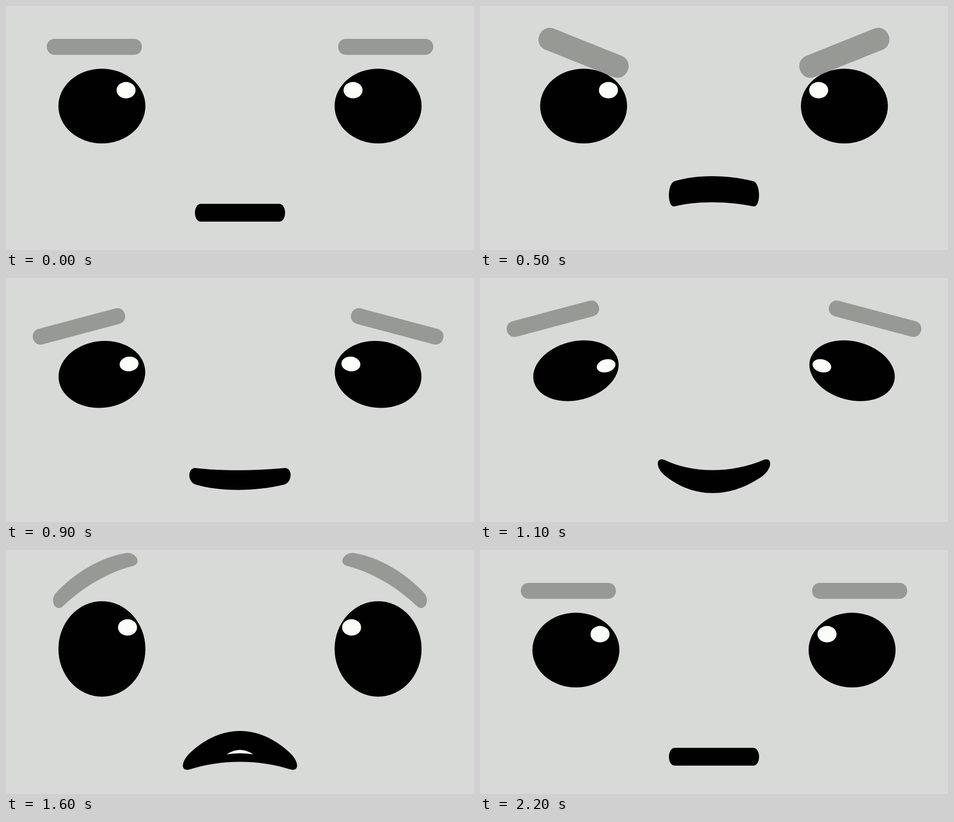
An HTML page with a canvas that plays this animation: 1033 by 542 pixels, repeating every 2300 ms.

```html
<!DOCTYPE html>
<html lang="en">
<head>
<meta charset="utf-8">
<title>Changing face</title>
<style>
  html, body { margin: 0; width: 100%; height: 100%; overflow: hidden; background: #d8dad7; }
  canvas { display: block; width: 1033px; height: 542px; }
</style>
</head>
<body>
<canvas id="stage" width="1033" height="542"></canvas>
<script>
const ctx = document.getElementById('stage').getContext('2d');
const W = 1033, H = 542, LOOP = 2300, STEP = 100;
const BROW_HALF = 105;
const BACK = '#d8dad7', BLACK = '#000100', GREY = '#979994', WHITE = '#fbfdf9';

// Lengths are pixels, tilts are degrees. Arch lifts the upper edge of a bar
// and hollow the lower one; lean moves the peak of both sideways.
// The left eye and brow are given; the right ones are mirrored and shifted.
const neutral = {
  eyeX: 211.7, eyeY: 222.3, eyeW: 96, eyeH: 83, eyeTilt: 0,
  glintX: 53.3, glintY: -35.3, glintShift: -2,
  browX: 195, browY: 90.7, browR: 17.7, browTilt: 0,
  browArch: 0, browHollow: 0, browLean: 0, browShift: 0,
  mouthY: 459.2, mouthHalf: 99.5, mouthR: 19.7,
  mouthArch: 0, mouthHollow: 0, mouthLean: 0, teeth: 0
};
const angry = {
  ...neutral, eyeX: 228.7, glintX: 54.8,
  browX: 228.7, browY: 115.4, browR: 25.3, browTilt: 15,
  mouthY: 417, mouthR: 28, mouthArch: 11, mouthHollow: 9, mouthLean: -6
};
const furious = { ...angry, browY: 104, browTilt: 22 };
const sad = {
  ...neutral, glintShift: 0,
  browX: 161, browY: 124.5, browTilt: -15, browShift: -17,
  mouthArch: 12.5, mouthHollow: 15, mouthLean: -9
};
const content = {
  ...sad, eyeY: 206, eyeH: 65, eyeTilt: -15, glintX: 66.7, glintY: -11,
  browY: 90.5, browShift: 0,
  mouthY: 422, mouthHalf: 124, mouthR: 17.2, mouthArch: -22, mouthHollow: -38.5, mouthLean: -4
};
const joyful = { ...content, browX: 144, browY: 79.5, mouthHollow: -96 };
const afraid = {
  ...neutral, eyeY: 219.8, eyeH: 106, glintX: 56.5, glintY: -47.8,
  browY: 65.5, browR: 16.5, browTilt: -30, browArch: 14, browHollow: 11, browLean: 4,
  mouthY: 468.5, mouthHalf: 126, mouthR: 18.5, mouthArch: 48, mouthHollow: 16.5, teeth: 1
};
const surprised = {
  ...neutral, eyeX: 206.2, eyeY: 184.7, eyeW: 84.5, eyeH: 103.5,
  glintX: 48.5, glintY: -38.4, glintShift: 0,
  browY: 41, browArch: 16.5, browHollow: 17.5, browLean: -6,
  mouthY: 472.9, mouthHalf: 81.5, mouthR: 40.2
};
const gasping = { ...surprised, mouthR: 63 };

const keys = [
  [0, neutral], [300, angry], [500, furious], [600, angry], [700, sad],
  [1100, content], [1200, joyful], [1600, afraid], [1800, gasping],
  [1900, surprised], [2200, neutral], [LOOP, neutral]
];

function poseAt(time) {
  const next = keys.findIndex(([start]) => start > time);
  const [t0, from] = keys[next - 1], [t1, to] = keys[next];
  const u = (time - t0) / (t1 - t0);
  const pose = {};
  for (const name in from) pose[name] = from[name] + (to[name] - from[name]) * u;
  return pose;
}

const radians = degrees => degrees * Math.PI / 180;

// A bar with round ends that carry on along the slope of its bent edges.
function bar(x, y, half, r, cap, tilt, arch, hollow, lean, color) {
  const end = half - cap, reach = end * 0.38;
  const out = end + cap * 4 / 3;
  const drop = bend => bend * 4 / 3 * (out - end) / (end - reach);
  const top = -r - arch * 4 / 3, bottom = r - hollow * 4 / 3;
  const upper = -r + drop(arch), lower = r + drop(hollow);
  ctx.save();
  ctx.translate(x, y);
  ctx.rotate(radians(tilt));
  ctx.fillStyle = color;
  ctx.beginPath();
  ctx.moveTo(-end, -r);
  ctx.bezierCurveTo(lean - reach, top, lean + reach, top, end, -r);
  ctx.bezierCurveTo(out, upper, out, lower, end, r);
  ctx.bezierCurveTo(lean + reach, bottom, lean - reach, bottom, -end, r);
  ctx.bezierCurveTo(-out, lower, -out, upper, -end, -r);
  ctx.fill();
  ctx.restore();
}

function oval(x, y, rx, ry, tilt, color) {
  ctx.fillStyle = color;
  ctx.beginPath();
  ctx.ellipse(x, y, rx, ry, radians(tilt), 0, Math.PI * 2);
  ctx.fill();
}

function drawSide(p, mirrored) {
  const place = shift => mirrored
    ? ctx.setTransform(-1, 0, 0, 1, W + shift, 0)
    : ctx.setTransform(1, 0, 0, 1, 0, 0);
  place(0);
  oval(p.eyeX, p.eyeY, p.eyeW, p.eyeH, p.eyeTilt, BLACK);
  place(p.glintShift);
  oval(p.eyeX + p.glintX, p.eyeY + p.glintY, 21, Math.min(p.eyeH, 83) * 0.22, p.eyeTilt, WHITE);
  place(p.browShift);
  bar(p.browX, p.browY, BROW_HALF, p.browR, p.browR, p.browTilt,
    p.browArch, p.browHollow, p.browLean, GREY);
}

function drawMouth(p) {
  const x = W / 2;
  bar(x, p.mouthY, p.mouthHalf, p.mouthR, p.mouthHalf * 0.13, 0,
    p.mouthArch, p.mouthHollow, p.mouthLean, BLACK);
  const y = p.mouthY - 14.5;
  ctx.fillStyle = WHITE;
  ctx.beginPath();
  ctx.moveTo(x - 29.5, y);
  ctx.quadraticCurveTo(x, y - 20 * p.teeth, x + 29.5, y);
  ctx.quadraticCurveTo(x, y - 5 * p.teeth, x - 29.5, y);
  if (p.teeth > 0) ctx.fill();
}

function draw(now) {
  const pose = poseAt(Math.floor(now % LOOP / STEP) * STEP);
  ctx.setTransform(1, 0, 0, 1, 0, 0);
  ctx.fillStyle = BACK;
  ctx.fillRect(0, 0, W, H);
  drawMouth(pose);
  drawSide(pose, false);
  drawSide(pose, true);
}

const start = performance.now();
function tick() {
  draw(performance.now() - start);
  requestAnimationFrame(tick);
}
tick();
</script>
</body>
</html>
```
